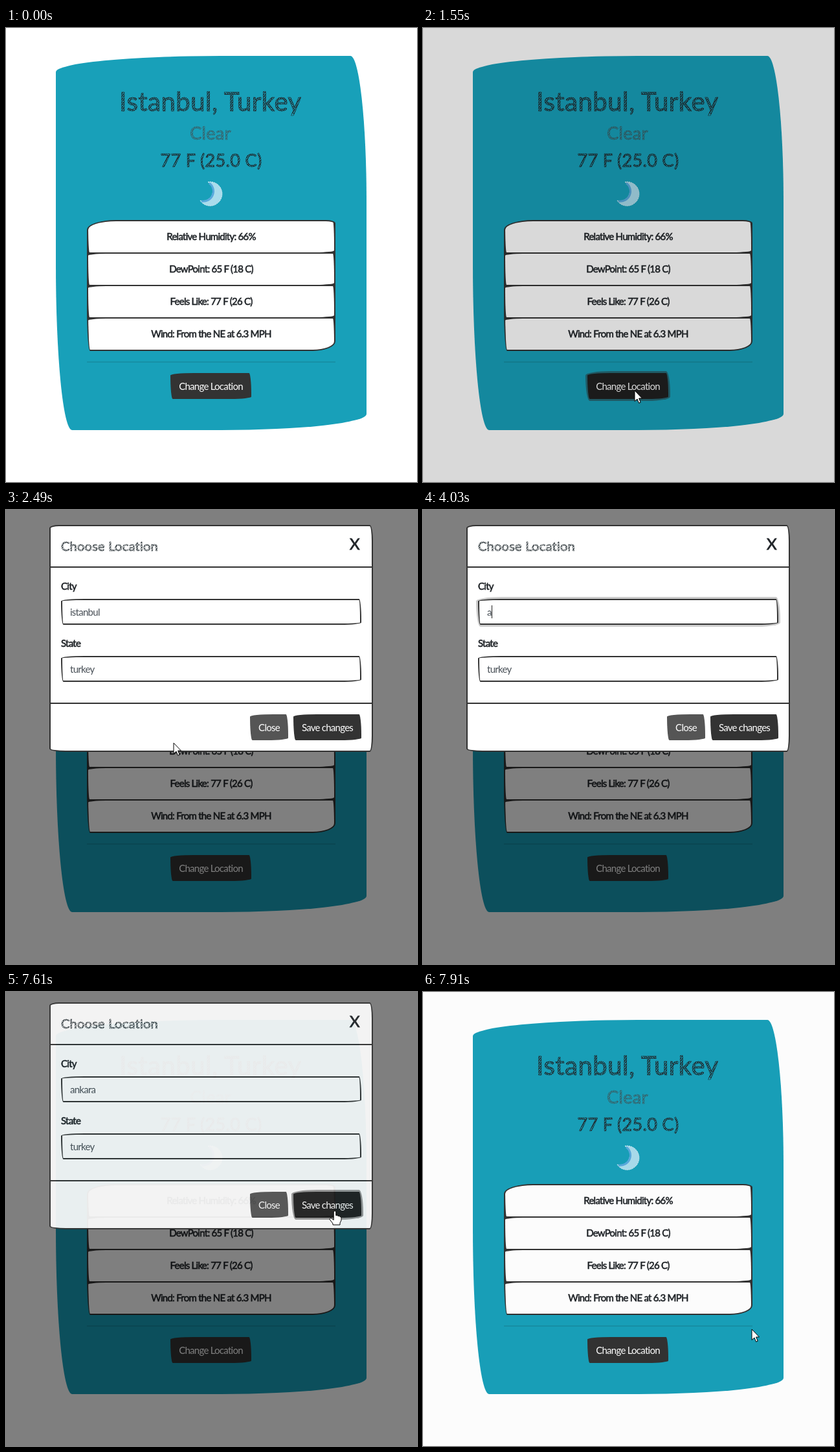
Write an HTML page that moves like this. It is 635 px wide and 700 px high and loops after 7990 ms.

```html
<!DOCTYPE html>
<html lang="en">
<head>
<meta charset="utf-8">
<title>Weather card</title>
<style>
  * { box-sizing: border-box; }
  html, body { margin: 0; width: 100%; height: 100%; overflow: hidden; background: #fff; }
  body { position: relative; font: 15px/40px Lato, sans-serif; letter-spacing: -.74px; color: #212529; }
  .layer { position: absolute; inset: 0; }
  .layer > * { position: absolute; white-space: nowrap; }
  .sketchy { border-radius: 255px 25px 225px 25px / 25px 225px 25px 255px; }
  .bold { -webkit-text-stroke: .6px; }

  .sketch {
    --ink: #212b30;
    color: transparent;
    letter-spacing: .0125em;
    -webkit-text-stroke: .6px var(--ink);
    background: repeating-linear-gradient(-58deg, var(--ink) 0 1.3px, transparent 1.3px 2.3px);
    -webkit-background-clip: text;
    background-clip: text;
  }
  .centred { left: 0; width: 632px; text-align: center; }
  #panel { left: 77px; top: 43px; width: 480px; height: 577px; background: #18a0b9; }
  #place { top: 93px; font-size: 40px; }
  #sky { --ink: #38636b; top: 142px; font-size: 27px; }
  #degrees { top: 184px; font-size: 27px; width: 634px; }
  #moon { left: 297px; top: 235px; }

  #facts {
    left: 125px; top: 296px; width: 384px; height: 202px;
    overflow: hidden; background: #333; border: 2px solid #333;
    border-radius: 45px 15px 35px 5px / 15px 5px 15px 65px;
  }
  #facts div {
    height: 48px; margin-bottom: 2px; line-height: 47px; text-align: center; background: #fff;
    border-radius: 28px 2px 28px 2px / 3px 40px 3px 45px;
  }
  #rule { left: 125px; top: 514px; width: 384px; height: 2px; background: rgba(0, 0, 0, .1); }

  .button { height: 40px; text-align: center; color: #fff; background: #333; }
  #change { left: 254px; top: 532px; width: 125px; }
  #close { left: 377px; top: 315px; width: 59px; background: #555; }
  #save { left: 444px; top: 315px; width: 105px; }

  #backdrop { background: #000; opacity: 0; }
  #modal { opacity: 0; }
  #sheet {
    left: 67px; top: 23px; width: 500px; height: 350px;
    background: #fff; border: 2px solid #333;
    border-radius: 15px 5px 5px 25px / 5px 25px 25px 5px;
  }
  .line { left: 68px; width: 498px; height: 2px; background: #333; }
  #heading { --ink: #40484c; left: 85px; top: 35px; font-size: 20px; -webkit-text-stroke-width: .5px; }
  #cross { left: 531px; top: 32px; font-size: 24px; letter-spacing: 0; -webkit-text-stroke: .8px; }
  .label { left: 85px; }
  .input {
    left: 85px; width: 464px; height: 40px; padding-left: 12px;
    line-height: 36px; color: #495057; background: #fff; border: 2px solid #333;
  }
  .input span { padding: 1px 0; }
  #word { position: absolute; left: 12px; }

  #pointer { left: 0; top: 0; width: 1px; height: 1px; overflow: visible; }
  #pointer path { fill: #fff; stroke: #000; stroke-width: 1; stroke-linejoin: round; opacity: 0; }
</style>
</head>
<body>
<div class="layer">
  <div id="panel" class="sketchy"></div>
  <div id="place" class="sketch centred">Istanbul, Turkey</div>
  <div id="sky" class="sketch centred">Clear</div>
  <div id="degrees" class="sketch centred">77 F (25.0 C)</div>
  <svg id="moon" width="42" height="42" viewBox="297 235 42 42">
    <path d="M312 237.5A18.5 18.5 0 1 1 300 266A15.6 15.6 0 0 0 312 237.5Z" fill="#a9dcec" stroke="#e4f5fa" stroke-dasharray="2 1"/>
    <path d="M302 267A15.6 15.6 0 0 0 314 239" fill="none" stroke="#58a9dd" stroke-width="3"/>
  </svg>
  <div id="facts" class="bold">
    <div>Relative Humidity: 66%</div>
    <div>DewPoint: 65 F (18 C)</div>
    <div>Feels Like: 77 F (26 C)</div>
    <div>Wind: From the NE at 6.3 MPH</div>
  </div>
  <div id="rule"></div>
  <div id="change" class="button sketchy">Change Location</div>
</div>

<div id="backdrop" class="layer"></div>

<div id="modal" class="layer">
  <div id="sheet"></div>
  <div id="heading" class="sketch">Choose Location</div>
  <div id="cross">X</div>
  <div class="line" style="top:87px"></div>
  <div class="label bold" style="top:97px">City</div>
  <div id="city" class="input sketchy" style="top:137px"><div id="word"></div><span id="previous">istanbul</span></div>
  <div class="label bold" style="top:185px">State</div>
  <div class="input sketchy" style="top:225px">turkey</div>
  <div class="line" style="top:297px"></div>
  <div id="close" class="button sketchy">Close</div>
  <div id="save" class="button sketchy">Save changes</div>
</div>

<div class="layer">
  <svg id="pointer">
    <path id="arrow" d="M0 0V16.5L4 13 6.6 19.3 9.2 18.2 6.6 12H11.5Z"/>
    <path id="hand" d="M-1.8 1.8Q0-1 1.8 1.8V7.5Q4 6.5 5 8.4Q7 7.6 7.8 9.4Q10 9 10 11.5V15L8 19V22H-3V20L-8 13.5Q-7.4 10.6-4.6 12.4L-1.8 14.5Z"/>
    <path id="beam" d="M-3 0H3M0 0V16M-3 16H3"/>
  </svg>
</div>

<script>
const LOOP = 7990;
const LEAD = 8; // keeps a pose from appearing one screen refresh late
const $ = id => document.getElementById(id);
const at = (x, y) => `translate(${x}px, ${y}px)`;
const ring = alpha => `0 0 0 3px rgba(51, 51, 51, ${alpha})`;
const caret = on => `1px 0 0 ${on ? '#222' : 'transparent'}`;

// Each stop is [ms, value, poses until the next stop]; a single pose simply holds.
function track(element, property, stops) {
  const frames = stops.map(([ms, value, poses = 1]) => ({
    [property]: value,
    offset: ms / LOOP,
    easing: poses > 1 ? `steps(${poses}, jump-none)` : 'steps(1, end)'
  }));
  frames.push({ [property]: stops.at(-1)[1], offset: 1 });
  element.animate(frames, { duration: LOOP, delay: -LEAD, iterations: Infinity });
}

track($('pointer'), 'transform', [
  [0, at(438, 675)],
  [460, at(438, 675), 8], [1077, at(327, 559)],
  [2250, at(322, 540), 8], [2866, at(175, 118), 3], [3097, at(175, 149)],
  [6830, at(478, 432), 7], [7369, at(508, 337)],
  [7760, at(508, 375)], [7830, at(508, 450)], [7910, at(508, 520)]
]);
track($('arrow'), 'opacity', [
  [0, 0], [460, 1], [1000, 0], [1550, 1], [2943, 0], [6830, 1], [7215, 0], [7760, 1]
]);
track($('hand'), 'opacity', [[0, 0], [1000, 1], [1550, 0], [7215, 1], [7760, 0]]);
track($('beam'), 'opacity', [[0, 0], [2943, 1], [3250, 0]]);

track($('change'), 'backgroundColor', [[0, '#333'], [1000, '#202020'], [1630, '#333']]);
track($('change'), 'boxShadow', [[0, ring(0)], [1400, ring(.5)], [2010, ring(0)]]);
track($('save'), 'backgroundColor', [[0, '#333'], [7215, '#202020'], [7760, '#333']]);
track($('save'), 'boxShadow', [[0, ring(0)], [7450, ring(.5)]]);
track($('city'), 'boxShadow', [
  [0, ring(0)], [3100, ring(.08)], [3170, ring(.2)], [3250, ring(.25)], [7450, ring(0)]
]);

track($('backdrop'), 'opacity', [
  [0, 0], [1550, .15], [1630, .415], [1700, .5], [7830, .283], [7910, .012]
]);
track($('modal'), 'opacity', [
  [0, 0], [1700, .2], [1780, .74], [1860, 1], [7610, .91], [7680, .43], [7760, 0]
]);
track($('modal'), 'transform', [
  [0, at(0, -87)], [1700, at(0, -73)], [1780, at(0, -40)], [1860, at(0, -16)],
  [1930, at(0, -3)], [2010, at(0, 0)], [7610, at(0, -7)], [7680, at(0, -38)]
]);

track($('previous'), 'opacity', [[0, 1], [4030, 0]]);
track($('previous'), 'color', [[0, '#495057'], [3250, '#fff']]);
track($('previous'), 'backgroundColor', [[0, 'transparent'], [3250, '#3390ff']]);

// Letter, time typed, then the times its caret goes off and on.
const keys = [
  ['a', 4030, 4210], ['n', 4360, 4680], ['k', 4680, 4830],
  ['a', 4830, 4980], ['r', 4980, 5230, 5730, 5980], ['a', 5980, 6280]
];
for (const [letter, typedAt, ...toggles] of keys) {
  const span = document.createElement('span');
  span.textContent = letter;
  $('word').append(span);
  track(span, 'opacity', [[0, 0], [typedAt, 1]]);
  track(span, 'boxShadow', [
    [0, caret(true)], ...toggles.map((ms, i) => [ms, caret(i % 2)])
  ]);
}
</script>
</body>
</html>
```
